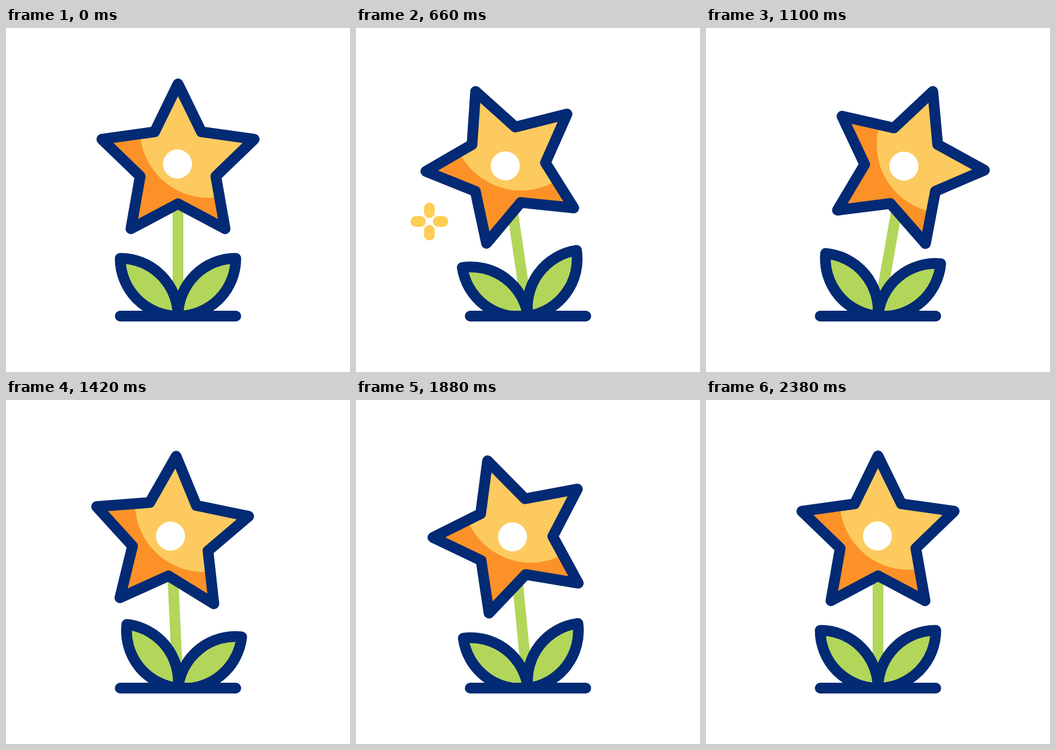
These frames come from a looping animation (640x640 px, 2.4 s). An HTML page:

```html
<!DOCTYPE html>
<html lang="en">
<head>
<meta charset="utf-8">
<title>Swaying star flower</title>
<style>
  html, body { margin: 0; width: 100%; height: 100%; overflow: hidden; background: #fff; }
  svg { display: block; width: 100%; height: 100%; }
  .ink { fill: none; stroke: #032a74; stroke-width: 20; stroke-linecap: round; stroke-linejoin: round; }
  .leaf { fill: #b2d65a; }
  .spark { fill: none; stroke: #fecd54; stroke-width: 20; stroke-linecap: round; }
</style>
</head>
<body>
<svg viewBox="0 0 640 640">
  <defs>
    <clipPath id="inside"><path class="star"/></clipPath>
    <clipPath id="above"><path d="M0 0H640V540H0Z"/></clipPath>
  </defs>
  <path id="stem" d="M320 536V253" stroke="#b2d65a" stroke-width="20"/>
  <g id="head">
    <path class="star" fill="#fc9127"/>
    <circle cx="377" cy="188" r="128" fill="#fcca5e" clip-path="url(#inside)"/>
    <path class="star ink"/>
    <circle cx="319" cy="253" r="27" fill="#fff"/>
  </g>
  <g clip-path="url(#above)">
    <g id="leaves">
      <path class="ink leaf" d="M320 536A107.5 107.5 0 0 0 212.5 428.5A107.5 107.5 0 0 0 320 536Z"/>
      <path class="ink leaf" d="M320 536A107.5 107.5 0 0 1 427.5 428.5A107.5 107.5 0 0 1 320 536Z"/>
    </g>
  </g>
  <path class="ink" d="M212.5 536H427.5"/>
  <path class="spark" id="low"/>
  <path class="spark" id="high"/>
</svg>
<script>
const LOOP = 2400;
const $ = id => document.getElementById(id);

// Keys are [ms, value] pairs with a sine ease between them.
const stemKeys = [[200, 0], [640, -8.5], [1100, 10], [1610, -8.1], [2340, 0]];
const headKeys = [[200, 0], [665, -22.1], [1160, 22.3], [1740, -21.9], [2290, 0]];
const leafKeys = [[200, 0], [680, -8.6], [1260, 8], [2015, -8.6], [2540, 0]];

function ease(t, from, to) {
  const u = Math.min(1, Math.max(0, (t - from) / (to - from)));
  return (1 - Math.cos(Math.PI * u)) / 2;
}

function at(keys, t) {
  let v = keys[0][1];
  for (let i = 1; i < keys.length; i++)
    v += (keys[i][1] - keys[i - 1][1]) * ease(t, keys[i - 1][0], keys[i][0]);
  return v;
}

function starPath() {
  const points = [];
  for (let i = 0; i < 10; i++) {
    const a = i * Math.PI / 5, r = i % 2 ? 74 : 149;
    points.push([320 + r * Math.sin(a), 253 - r * Math.cos(a)]);
  }
  return "M" + points.join("L") + "Z";
}

// Four rays grow outward, then their inner ends catch up.
function spark(el, t, x, y, start, length) {
  const inner = 16.5 + length * ease(t, start + 180, start + 420);
  const outer = 16.5 + length * ease(t, start, start + 280);
  el.setAttribute("d", outer - inner < 0.05 ? "" :
    [[1, 0], [0, 1], [-1, 0], [0, -1]].map(([dx, dy]) =>
      `M${x + dx * inner} ${y + dy * inner}L${x + dx * outer} ${y + dy * outer}`).join(""));
}

function turn(el, transform) { el.setAttribute("transform", transform); }

function draw(now) {
  let t = now % LOOP;
  if (t >= 2380) t = 0;
  const sway = at(stemKeys, t), tilt = at(headKeys, t);
  turn($("stem"), `rotate(${sway} 320 536)`);
  turn($("head"), `rotate(${sway} 320 536) rotate(${tilt - sway} 320 253)`);
  turn($("leaves"), `rotate(${at(leafKeys, t)} 320 536)`);
  spark($("low"), t, 136.5, 360, 540, 22);
  spark($("high"), t, 493.5, 132, 1900, 28);
}

document.querySelectorAll(".star").forEach(p => p.setAttribute("d", starPath()));
const begin = performance.now();
function tick() {
  draw(performance.now() - begin);
  requestAnimationFrame(tick);
}
tick();
</script>
</body>
</html>
```
